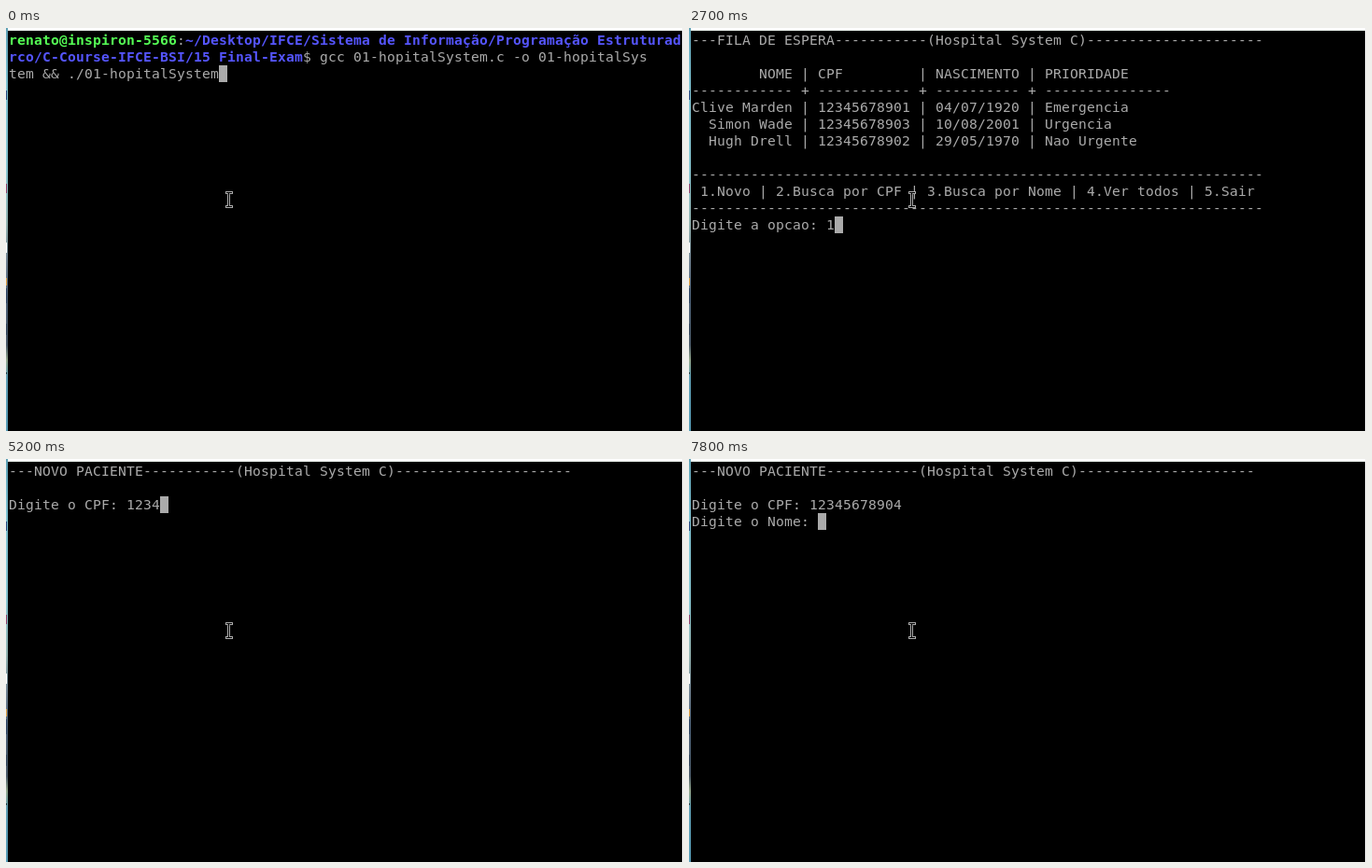
Write an HTML page that moves like this. It is 725x432 px and loops after 8000 ms.

```html
<!DOCTYPE html>
<html lang="pt">
<head>
<meta charset="utf-8">
<title>Hospital System C</title>
<style>
  html, body { margin: 0; width: 100%; height: 100%; overflow: hidden; background: #000; }
  #stage { position: relative; width: 725px; height: 432px; overflow: hidden; background: #000; }
  #stage > * { position: absolute; }
  #top { left: 0; top: 0; width: 725px; height: 3px; background: linear-gradient(#fff 1px, #eef3f0 2px, #dfe8e2); }
  #right { left: 724px; top: 0; width: 1px; height: 432px; background: #f0f0f0; }
  #left {
    left: 0; top: 0; width: 2px; height: 432px;
    background: linear-gradient(#5c9fb4, #7cc0cf 60px, #86c5d0 150px, #93b3b0 210px,
      #6f8190 250px, #4b6076 290px, #4a5a68 340px, #93a78c 356px, #5f9fb4 374px, #569cb6);
  }
  #left i { position: absolute; left: 0; width: 1px; }
  #screen {
    left: 3px; top: 4px; margin: 0; color: #aaa; white-space: pre;
    font: 14.667px/18px "DejaVu Sans Mono", monospace;
    letter-spacing: calc(9px - 1ch); font-variant-ligatures: none;
  }
  #screen b { color: #55f; }
  #screen b.user { color: #5f5; }
  #caret { left: 3px; top: 4px; width: 9px; height: 18px; background: #aaa; }
  #mouse { left: 230px; top: 170px; }
</style>
</head>
<body>
<div id="stage">
  <div id="top"></div>
  <div id="left">
    <i style="top:67px;height:10px;background:#27457c"></i>
    <i style="top:167px;height:10px;background:#8c3b68"></i>
    <i style="top:230px;height:11px;background:#fff"></i>
    <i style="top:268px;height:8px;background:#e0a040"></i>
    <i style="top:279px;height:16px;background:#2c4260"></i>
    <i style="top:317px;height:12px;background:#304258"></i>
    <i style="top:369px;height:2px;background:#243c44"></i>
  </div>
  <div id="right"></div>
  <pre id="screen"></pre>
  <div id="caret"></div>
  <svg id="mouse" width="18" height="28" fill="none" stroke-linecap="square">
    <path id="beam" d="M6.5 6.5H7.5L8.5 7.5L9.5 6.5H11.5M8.5 7.5V20.5M6.5 21.5H7.5L8.5 20.5L9.5 21.5H11.5" stroke="#aaa" stroke-width="3"/>
    <use href="#beam" style="stroke:#000"/>
    <path d="M6.5 6.5H11.5M8.5 6.5V21.5M6.5 21.5H11.5" stroke="#000"/>
  </svg>
</div>
<script>
const LOOP = 8000;
const screen = document.getElementById('screen');
const caret = document.getElementById('caret');
const dash = n => '-'.repeat(n);
const title = name => `---${name}${dash(11)}(Hospital System C)${dash(21)}\n\n`;
const row = (name, cpf, born, priority, bar = '|') =>
  [name.padStart(12), cpf.padEnd(11), born.padEnd(10), priority].join(` ${bar} `) + '\n';

const shell =
  '<b class="user">renato@inspiron-5566</b>:' +
  '<b>~/Desktop/IFCE/Sistema de Informação/Programação Estruturad\n' +
  'rco/C-Course-IFCE-BSI/15 Final-Exam</b>$ gcc 01-hopitalSystem.c -o 01-hopitalSys\n' +
  'tem &amp;&amp; ./01-hopitalSystem';

const queue = title('FILA DE ESPERA') +
  row('NOME', 'CPF', 'NASCIMENTO', 'PRIORIDADE') +
  row(dash(12), dash(11), dash(10), dash(15), '+') +
  row('Clive Marden', '12345678901', '04/07/1920', 'Emergencia') +
  row('Simon Wade', '12345678903', '10/08/2001', 'Urgencia') +
  row('Hugh Drell', '12345678902', '29/05/1970', 'Nao Urgente') +
  `\n${dash(68)}\n` +
  ' 1.Novo | 2.Busca por CPF | 3.Busca por Nome | 4.Ver todos | 5.Sair\n' +
  `${dash(68)}\nDigite a opcao: `;

const patient = title('NOVO PACIENTE') + 'Digite o CPF: ';
const cpf = '12345678904';
const keyTimes = [4600, 4800, 5000, 5200, 5500, 5700, 6000, 6200, 6400, 6700, 7200];

// Each step: start time and the terminal contents from then on
const steps = [
  [0, shell],
  [600, shell + '\n'],
  [800, queue],
  [2700, queue + '1'],
  [3400, patient],
  ...keyTimes.map((time, i) => [time, patient + cpf.slice(0, i + 1)]),
  [7800, `${patient}${cpf}\nDigite o Nome: `]
];

let shown = null;

function show(step) {
  if (step === shown) return;
  shown = step;
  screen.innerHTML = step[1];
  const lines = screen.textContent.split('\n');
  const col = lines[lines.length - 1].length;
  caret.style.transform = `translate(${col * 9}px, ${(lines.length - 1) * 18}px)`;
}

function draw() {
  const time = performance.now() % LOOP;
  show(steps.filter(([start]) => start <= time).pop());
  requestAnimationFrame(draw);
}
draw();
</script>
</body>
</html>
```
